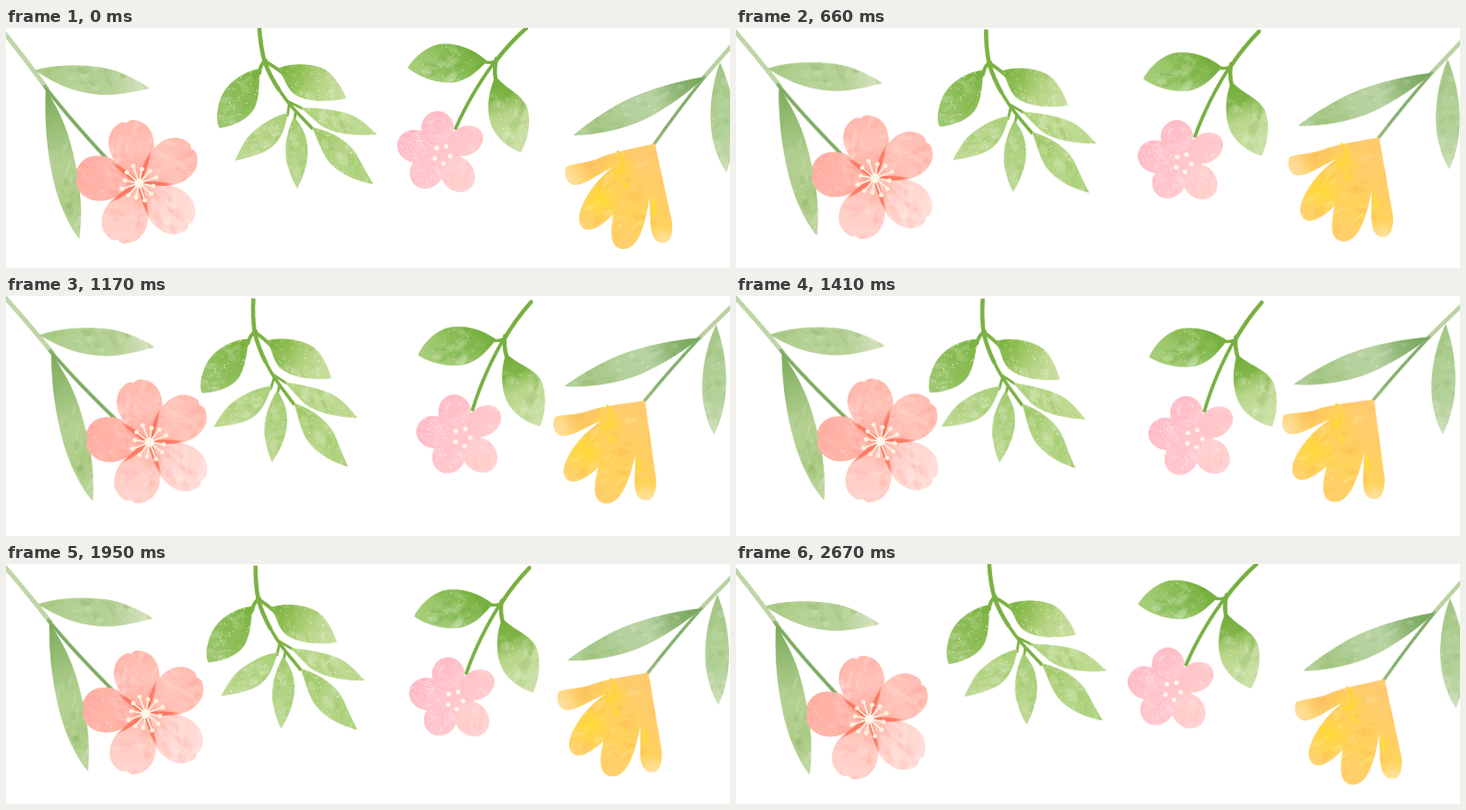
Write an HTML page with a canvas that moves like this. It is 800x266 px and loops after 2700 ms.

```html
<!DOCTYPE html>
<html lang="en">
<head>
<meta charset="utf-8">
<title>Swaying flowers</title>
<style>
  html, body { margin: 0; width: 100%; height: 100%; overflow: hidden; background: #fff; }
  canvas { display: block; }
</style>
</head>
<body>
<canvas id="stage" width="800" height="266"></canvas>
<script>
const LOOP = 2700, STEP = 30, MARGIN = 30, SCALE = 2;
const ctx = document.getElementById('stage').getContext('2d');
let g;          // context of the sprite being painted
let seed = 1;

function random() {
  seed = (seed * 16807) % 2147483647;
  return seed / 2147483647;
}
const spread = r => (random() * 2 - 1) * r;

function dot(x, y, r, color) {
  g.fillStyle = color;
  g.beginPath();
  g.arc(x, y, r, 0, Math.PI * 2);
  g.fill();
}

// Watercolour fill: gradient along an axis, soft blots and optional white specks.
function wash(d, [x0, y0, x1, y1], colors, { width = 22, blots = 40, dark = '105,155,65', specks = 0, grain = 0.1 } = {}) {
  const path = typeof d === 'string' ? new Path2D(d) : d;
  const fill = g.createLinearGradient(x0, y0, x1, y1);
  colors.forEach((c, i) => fill.addColorStop(i / (colors.length - 1), c));
  g.save();
  g.fillStyle = fill;
  g.fill(path);
  g.clip(path);
  const angle = Math.atan2(y1 - y0, x1 - x0);
  const place = () => {
    const k = random();
    return [x0 + (x1 - x0) * k + spread(width), y0 + (y1 - y0) * k + spread(width)];
  };
  for (let i = 0; i < blots; i++) {
    const [x, y] = place();
    g.fillStyle = `rgba(${i % 2 ? dark : '255,255,255'},${grain * (0.5 + random())})`;
    g.beginPath();
    g.ellipse(x, y, 3 + random() * 7, 1 + random() * 4, angle + 0.6 + spread(0.7), 0, Math.PI * 2);
    g.fill();
  }
  for (let i = 0; i < specks; i++) {
    const [x, y] = place();
    g.fillStyle = 'rgba(255,255,255,0.85)';
    g.fillRect(x, y, 1, 1);
  }
  g.restore();
}

function stem(d, color, width, cap = 'round') {
  g.strokeStyle = color;
  g.lineWidth = width;
  g.lineCap = cap;
  g.stroke(new Path2D(d));
}

function blossomPetal(cx, cy, degrees, length, colors) {
  const a = degrees * Math.PI / 180;
  const shape = new Path2D('M0 0 C12 -6 23 -25 44 -25 C56 -25 65 -18 68 -9 Q70 -4 67 -1 Q71 4 68 10 C64 20 56 25 44 25 C24 25 12 7 0 0 Z');
  const path = new Path2D();
  path.addPath(shape, new DOMMatrix().translate(cx, cy).rotate(degrees).scale(length / 70, 1));
  wash(path, [cx, cy, cx + Math.cos(a) * length, cy + Math.sin(a) * length], colors,
    { width: 26, blots: 46, dark: '255,130,115', specks: 18, grain: 0.1 });
}

function paintBlossom() {
  stem('M-8 -2 Q16 27 45 67', '#c0d5a6', 5);
  stem('M43 65 Q72 103 118 152', '#8bb56f', 4);
  stem('M44 67 Q72 102 110 144', 'rgba(90,145,70,.35)', 1.6);
  wash('M32 47 C55 39 105 39 130 51 C142 56 152 62 159 67 C140 71 122 75 105 74 C75 72 55 62 32 47Z',
    [33, 48, 159, 67], ['#a9c984', '#b6d296', '#b4d094', '#dce6c6'], { specks: 8 });
  wash('M44 67 C42 100 45 142 55 179 C62 203 71 221 81 234 C85 205 83 175 73 134 C66 105 56 88 44 67Z',
    [44, 68, 81, 234], ['#7caa5a', '#98bf77', '#b5d192', '#aecd88', '#bed7a0'], { specks: 8 });

  const cx = 147, cy = 172;
  blossomPetal(cx, cy, 40, 74, ['#ffb9ac', '#ffd6d0', '#ffded8']);
  blossomPetal(cx, cy, 111, 70, ['#ffb3a5', '#ffcfc7', '#ffd1ca']);
  blossomPetal(cx, cy, 187, 71, ['#ff9d8d', '#ffb5a9', '#ffaea2']);
  blossomPetal(cx, cy, -33, 72, ['#ffac9e', '#ffc5bb', '#ffbcb1']);
  blossomPetal(cx, cy, -101, 71, ['#ffa799', '#ffc2b8', '#ffb9ae']);

  g.save();
  g.translate(cx, cy);
  for (let i = 0; i < 5; i++) {
    g.save();
    g.rotate((i * 72 + 2) * Math.PI / 180);
    const streak = g.createLinearGradient(0, 0, 42, 0);
    streak.addColorStop(0, 'rgba(248,100,72,.8)');
    streak.addColorStop(0.7, 'rgba(250,105,80,.75)');
    streak.addColorStop(1, 'rgba(255,140,120,0)');
    g.fillStyle = streak;
    g.fill(new Path2D('M0 -2 Q22 -3.5 42 0 Q24 3.5 0 2Z'));
    g.restore();
  }
  for (let i = 0; i < 12; i++) {
    const a = i * Math.PI / 6 + 0.2;
    const r = 16 + (i % 3) * 2;
    const x = Math.cos(a) * r, y = Math.sin(a) * r;
    stem(`M0 0L${x} ${y}`, '#fff0e0', 1.9);
    dot(x, y, 2.5, '#fff0dc');
  }
  dot(0, 0, 5, '#fff8ea');
  g.restore();
}

function paintBranch() {
  const green = '#7ab142';
  stem('M280 0 Q281 20 286 38 Q298 68 320 92 L339 112', green, 3.6, 'butt');
  stem('M280 0 Q281 20 286 38 Q292 54 302 69', green, 4.6, 'butt');
  stem('M287 36 Q281 40 280 50', green, 4);
  stem('M286 37 Q294 41 306 50', green, 4);
  stem('M311 81 L327 89 M313 84 L311 97 M320 92 L319 101', green, 2.8);
  const opts = { specks: 55, dark: '105,165,45' };
  wash('M281 45 C262 48 240 62 235 85 C232 98 233 106 236 111 C250 109 268 102 275 88 C281 74 279 58 281 45Z',
    [281, 46, 236, 110], ['#79b13f', '#88ba50', '#96c363', '#9fc870'], opts);
  wash('M300 45 C315 38 345 38 358 50 C366 58 372 68 376 78 C355 83 330 82 318 73 C309 65 308 55 300 45Z',
    [300, 45, 376, 78], ['#76b03b', '#98c45e', '#bed88e', '#cbdfa4'], opts);
  wash('M312 94 C296 97 273 111 263 127 C258 136 255 142 253 147 C272 143 292 138 301 124 C308 114 309 104 312 94Z',
    [312, 94, 253, 147], ['#a9cf77', '#b8d68a', '#bfda94'], opts);
  wash('M325 88 C345 89 375 90 390 101 C400 108 405 113 410 118 C390 120 362 118 348 108 C338 100 332 94 325 88Z',
    [324, 87, 410, 118], ['#b0d37f', '#c0db93', '#bbd88c'], opts);
  wash('M318 98 C309 118 306 140 312 155 C315 165 318 172 322 178 C328 165 335 150 333 130 C331 115 326 108 318 98Z',
    [318, 97, 322, 178], ['#a2ca6d', '#b1d382', '#bfda98'], opts);
  wash('M338 110 C355 113 380 124 389 143 C396 156 401 165 406 173 C388 170 367 162 355 146 C347 134 344 122 338 110Z',
    [338, 110, 406, 173], ['#a5cc6f', '#b7d688', '#add27b'], opts);
}

function paintPinkSprig() {
  const green = '#77af40';
  stem('M575 0 Q556 17 541 37', green, 4.5);
  stem('M541 36 Q514 72 497 111', green, 3.8);
  stem('M541 37 Q534 40 524 36', green, 3.4);
  stem('M542 34 Q539 45 541 57', green, 4.5);
  const opts = { specks: 26, dark: '85,150,35', grain: 0.1 };
  wash('M532 37 C518 24 497 15 478 18 C462 22 450 34 444 44 C455 54 478 63 497 60 C514 56 522 46 532 37Z',
    [510, 20, 470, 60], ['#76b03f', '#86ba50', '#9bc76c', '#a5cd78'], opts);
  wash('M541 53 C532 72 530 95 538 112 C546 126 558 134 569 138 C576 125 581 105 576 88 C569 72 552 68 541 53Z',
    [543, 54, 566, 138], ['#71ab38', '#82b74a', '#b9d68a', '#c3dc9a', '#cee2ac'], opts);

  const petal = (x, y, rx, ry, tint, specks) => {
    const path = new Path2D();
    path.ellipse(x, y, rx, ry, Math.atan2(y - 139, x - 481), 0, Math.PI * 2);
    wash(path, [x - 12, y - 8, x + 12, y + 8], tint,
      { width: 14, blots: 16, dark: '255,165,170', specks, grain: 0.07 });
  };
  dot(481, 138, 22, '#ffc6cc');
  petal(499, 162, 21, 18, ['#ffcdcc', '#ffd3d0'], 3);
  petal(465, 159, 20, 18, ['#ffc3cc', '#ffc9cf'], 50);
  petal(452, 131, 20, 18, ['#ffbcc8', '#ffc5cd'], 70);
  petal(477, 111, 19, 18, ['#ffbdc8', '#ffc5cb'], 24);
  petal(508, 125, 20, 16, ['#ffc4c9', '#ffcbcb'], 4);
  for (let i = 0; i < 5; i++) {
    const a = (i * 72 - 62) * Math.PI / 180;
    dot(482 + Math.cos(a) * 9, 140 + Math.sin(a) * 10, 2.7, '#fff4e8');
  }
}

function paintYellowBell() {
  stem('M814 6 Q794 28 771 55', '#bad1a2', 4.6);
  stem('M772 54 Q744 89 716 129', '#94b97c', 3.6);
  stem('M771 56 Q746 87 726 114', 'rgba(85,140,70,.35)', 1.5);
  wash('M772 54 C745 58 700 70 672 87 C652 99 638 109 627 119 C654 119 690 111 716 96 C740 82 758 68 772 54Z',
    [772, 55, 627, 119], ['#74a458', '#8cb573', '#b9d3a2', '#b3cf9a', '#a8c987', '#b0ce94'], { specks: 6 });
  wash('M789 38 C779 65 775 100 782 128 C787 145 791 153 796 160 C804 140 808 115 803 85 C800 65 795 52 789 38Z',
    [789, 40, 796, 160], ['#a4c585', '#aecd90', '#b5d29a', '#d0e1ba'], { specks: 4 });

  const bell = new Path2D('M717 128 L736 215 C737 228 734 238 727 238 C718 239 713 232 712 215 L711 188 C707 215 700 245 682 245 C668 244 667 230 671 206 C660 218 648 226 640 223 C630 218 632 205 640 190 C648 175 658 164 671 154 C655 161 641 174 628 174 C619 173 616 162 619 154 C626 150 643 150 656 144 C666 139 690 134 717 128Z');
  wash(bell, [705, 130, 652, 226], ['#ffcb70', '#ffce66', '#ffd35b', '#ffd26d'],
    { width: 45, blots: 90, dark: '248,172,65', specks: 8, grain: 0.13 });
  g.save();
  g.clip(bell);
  const glow = (x, y, r, rgb, alpha) => {
    const soft = g.createRadialGradient(x, y, 0, x, y, r);
    soft.addColorStop(0, `rgba(${rgb},${alpha})`);
    soft.addColorStop(1, `rgba(${rgb},0)`);
    dot(x, y, r, soft);
  };
  glow(622, 168, 28, '255,226,180', 0.8);
  glow(727, 237, 18, '255,232,190', 0.75);
  glow(646, 152, 20, '250,185,90', 0.6);
  glow(655, 190, 26, '255,220,40', 0.65);
  glow(678, 158, 20, '255,215,50', 0.6);
  glow(682, 235, 22, '255,205,105', 0.7);
  g.restore();
  stem('M676 137 Q683 145 682 154 Q679 161 673 161', '#ffd62e', 2.6);
  stem('M682 172 L686 176 M657 188 L660 193 M715 193 L717 206', '#ffdc35', 3.6);
}

function sprite(paint, startSeed) {
  const sheet = document.createElement('canvas');
  sheet.width = (800 + 2 * MARGIN) * SCALE;
  sheet.height = (266 + 2 * MARGIN) * SCALE;
  g = sheet.getContext('2d');
  g.scale(SCALE, SCALE);
  g.translate(MARGIN, MARGIN);
  seed = startSeed;
  paint();
  return sheet;
}

// Each piece swings about a point beyond the stage.
const pieces = [
  { sheet: sprite(paintBlossom, 11), x: -32, y: -46, swing: -0.062 },
  { sheet: sprite(paintBranch, 277), x: 255, y: -54, swing: 0.137 },
  { sheet: sprite(paintPinkSprig, 3911), x: 634, y: -42, swing: -0.134 },
  { sheet: sprite(paintYellowBell, 5003), x: 872, y: -22, swing: 0.0873 },
];

function draw(now) {
  const t = Math.floor((now % LOOP) / STEP) * STEP;
  const phase = 1 - Math.abs(1 - t / (LOOP / 2));
  ctx.fillStyle = '#fff';
  ctx.fillRect(0, 0, 800, 266);
  ctx.imageSmoothingQuality = 'high';
  for (const { sheet, x, y, swing } of pieces) {
    ctx.save();
    ctx.translate(x, y);
    ctx.rotate(swing * phase);
    ctx.translate(-x, -y);
    ctx.drawImage(sheet, -MARGIN, -MARGIN, 800 + 2 * MARGIN, 266 + 2 * MARGIN);
    ctx.restore();
  }
}

let start;
function tick(now) {
  start ??= now;
  draw(now - start);
  requestAnimationFrame(tick);
}
draw(0);
requestAnimationFrame(tick);
</script>
</body>
</html>
```
